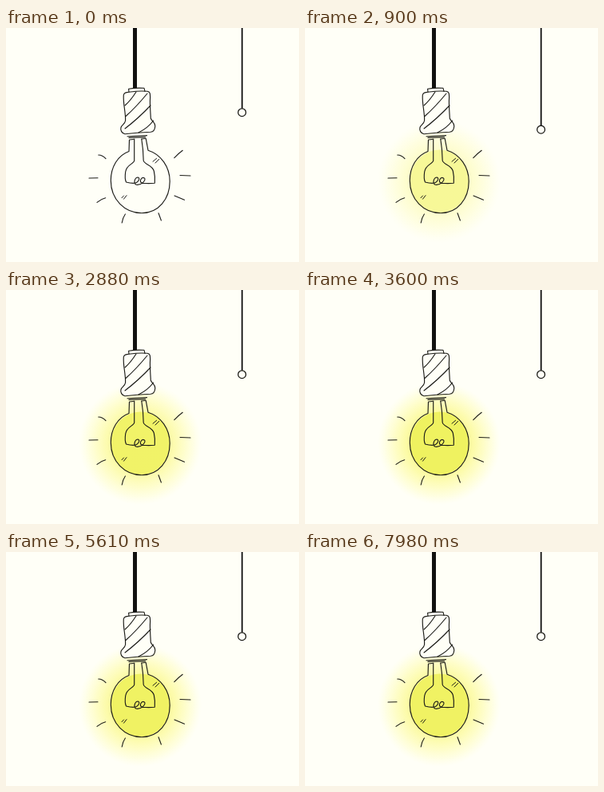
Animation of 367 by 293 pixels, one loop 8 s. Source, as an HTML page with a canvas:

```html
<!DOCTYPE html>
<html lang="en">
<head>
<meta charset="utf-8">
<title>Light bulb</title>
<style>
html, body { margin: 0; width: 100%; height: 100%; overflow: hidden; background: #fffff7; }
canvas { display: block; }
</style>
</head>
<body>
<canvas id="stage" width="367" height="293"></canvas>
<script>
const ctx = document.getElementById('stage').getContext('2d');
const LOOP = 8000, PAPER = '#fffff7', INK = '#1c1c18';

const socket = new Path2D('M147.3 84 C148 80 152 80.5 156 80 Q167 78.5 177 79.3 C181 80 180.5 83 180.6 87 C180 96 181 105 181.3 113 C182.5 117 187 118 186.8 123 C186.5 127 185 130 181 130.3 Q164 131 149 132.7 C145 132 143 128 144 124.5 C145.5 121 149 120 149.6 116 C150 105 146.5 95 147.3 84 Z');
const cap = new Path2D('M154 80 L153.6 76.3 Q163 74.5 173 75.3 L174 79.3');
const stripes = new Path2D('M149 97 Q156 91 163 80 M149.5 111 Q163 99 177 82 M149 126 Q166 113 181 97 M166 131 Q178 125 184.5 116');
const collar = new Path2D('M152 135.7 L176.5 134.6 M154 137.4 L174.5 136.6');
const glass = new Path2D('M160.7 139.2 L154.5 140 L154 154.5 C140 159.5 131.3 174 131.3 191 C131.3 215 149 231.7 170 231.7 C191 231.7 205.2 214 205.2 192 C205.2 174 194 158 178 153.2 L175.2 138.3 L169.8 139');
const stem = new Path2D('M160.7 139.2 L160.7 166 C160.5 170 151 171 149.7 180 Q148.5 189 150.5 193 Q156 194.5 160.5 194.3 C166 194 168.5 187.5 165.3 187 C161 187 159 195.5 163.5 196.3 C169.5 197 176 190.5 173.4 187.9 C169.5 186 166 192.5 170.5 194.2 Q178 195 186.3 194.3 Q187 186 185.3 179 C183 171 173 171 172.2 166 Q172 152 169.8 139');
const marks = new Path2D('M184 167.2 L188.6 163.3 M187 169 L191.8 164.3 M145 212.7 L147.5 210 M147.5 214.2 L151 209.7');
const rays = new Path2D('M115.8 159 Q121 159 125 163.7 M104 188 L115 187.8 M114 218.3 Q119 214 124.7 212.7 M149.4 233 Q146 238 145.2 244 M191 231.8 L194.4 241 M211 210 L223.5 215.3 M218 184.5 L231 185 M210.8 162.7 Q215 158 221.2 153.3');

const clamp = x => Math.max(0, Math.min(1, x));
const smooth = x => (1 - Math.cos(Math.PI * clamp(x))) / 2;

function stroke(path, width) {
  ctx.lineWidth = width;
  ctx.stroke(path);
}

function drawLight(level) {
  if (level <= 0) return;
  ctx.globalAlpha = level;
  const glow = ctx.createRadialGradient(168, 192, 34, 168, 192, 77);
  glow.addColorStop(0, 'rgba(249,247,115,.74)');
  glow.addColorStop(0.25, 'rgba(251,249,130,.64)');
  glow.addColorStop(0.5, 'rgba(253,251,145,.48)');
  glow.addColorStop(0.75, 'rgba(254,253,160,.26)');
  glow.addColorStop(1, 'rgba(255,255,190,0)');
  ctx.fillStyle = glow;
  ctx.fillRect(85, 110, 166, 162);
  ctx.beginPath();
  ctx.ellipse(168.4, 192, 37, 39.5, 0, 0, Math.PI * 2);
  ctx.fillStyle = 'rgba(238,241,88,.86)';
  ctx.fill();
  ctx.globalAlpha = 1;
}

function drawBulb() {
  ctx.fillStyle = PAPER;
  ctx.fill(socket);
  ctx.fillStyle = '#111';
  ctx.fillRect(159, 0, 5, 75);
  ctx.strokeStyle = INK;
  for (const path of [cap, socket, stripes, collar, glass, stem]) stroke(path, 1.15);
  stroke(marks, 1);
  stroke(rays, 1.1);
}

function drawPull(y) {
  ctx.fillStyle = '#111';
  ctx.fillRect(294.8, 0, 1.8, y - 4.7);
  ctx.beginPath();
  ctx.arc(295.6, y, 4.9, 0, Math.PI * 2);
  ctx.fillStyle = PAPER;
  ctx.fill();
  ctx.lineWidth = 1.3;
  ctx.stroke();
}

function draw(t) {
  const pull = smooth((t - 240) / 600) - smooth((t - 840) / 600);
  const pulse = 0.91 + 0.09 * Math.cos(2 * Math.PI * (t - 1130) / 2430);
  ctx.fillStyle = PAPER;
  ctx.fillRect(0, 0, 367, 293);
  drawLight(smooth((t - 600) / 600) * pulse);
  drawBulb();
  drawPull(105.7 + 22 * pull);
}

ctx.lineCap = ctx.lineJoin = 'round';
const start = performance.now();
function tick() {
  draw((performance.now() - start) % LOOP);
  requestAnimationFrame(tick);
}
tick();
</script>
</body>
</html>
```
